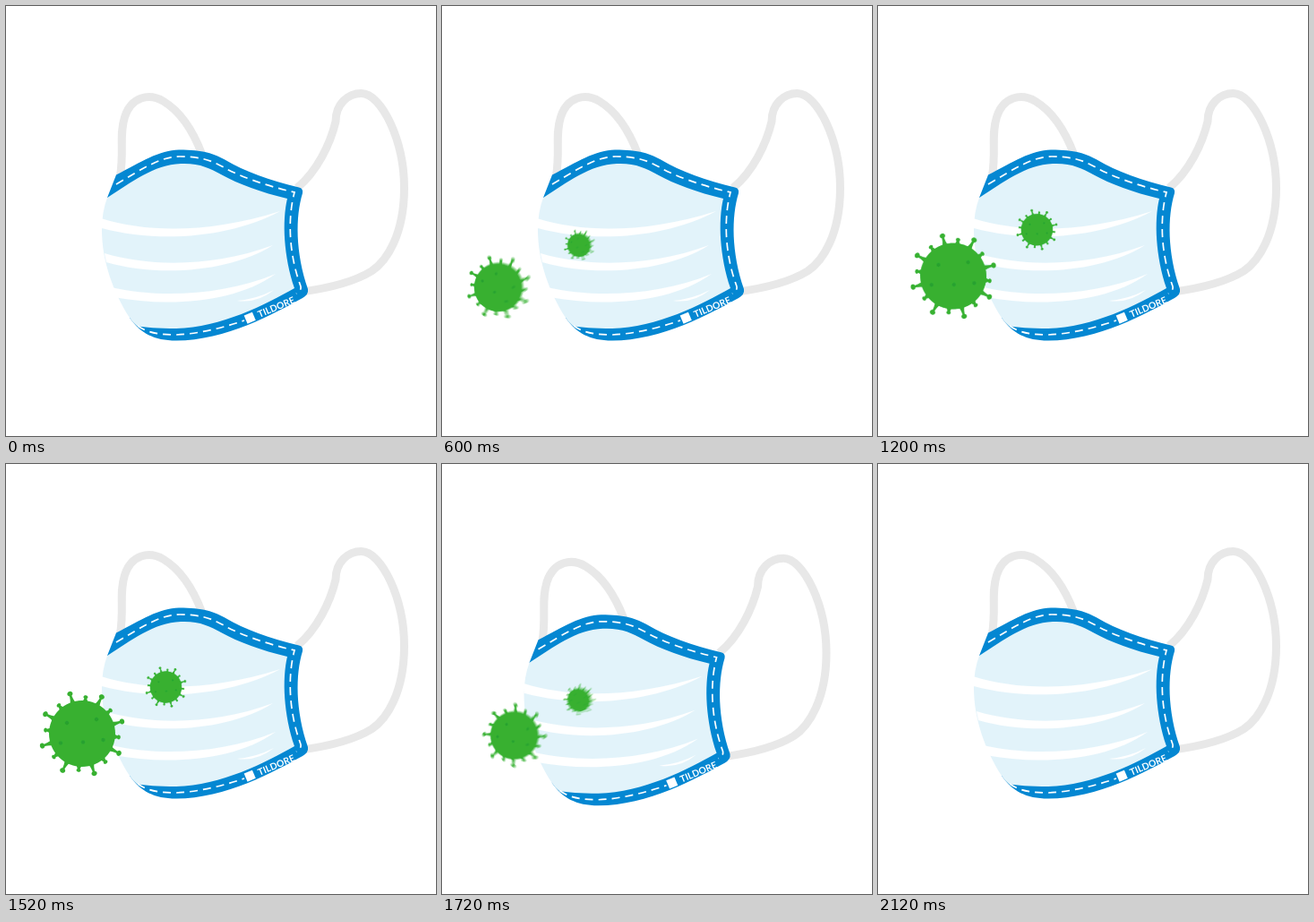
An HTML page with a canvas for the animation above (2400 ms loop, 480x480 px).

```html
<!DOCTYPE html>
<html lang="en">
<head>
<meta charset="utf-8">
<title>Mask and viruses</title>
<style>
html, body { margin: 0; height: 100%; overflow: hidden; background: #fff; }
canvas { display: block; }
</style>
</head>
<body>
<canvas id="stage" width="480" height="480"></canvas>
<script>
const LOOP = 2400, STEP = 40, SHUTTER = 28, SAMPLES = 8;
const BLUE = '#0487d2', PALE = '#e2f3fa', GREY = '#e8e8e8', GREEN = '#35b233', DARK = '#2aa22c';

const makeLayer = size => {
  const c = document.createElement('canvas');
  c.width = c.height = size;
  return c.getContext('2d');
};
const ctx = document.getElementById('stage').getContext('2d');
const blurLayer = makeLayer(480);
blurLayer.imageSmoothingQuality = 'high';

const progress = (t, from, to) => Math.min(1, Math.max(0, (t - from) / (to - from)));
const smooth = u => u * u * (3 - 2 * u);
const cubicOut = u => 1 - (1 - u) ** 3;

const straps = new Path2D(
  'M127.5 190C132 160 126 145 132.5 124C140 101 160 97 176 106.5C195 118 209 140 218.5 165' +
  'M325 203C347 185 362 154 368 129C368 109 382 97.5 396.5 97.5C419 97.5 444.5 150 444.5 203' +
  'C444.5 255 425 285 408 296C390 307 360 315 330 319');
const border = new Path2D(
  'M123 188.5C150 174.5 172 160.5 193 160.5C220 160.5 232 164.5 246 172.5C265 184 295 195 327 202.5' +
  'Q332 203.5 331 209C323 235 323 275 337 316Q338 322 331 326' +
  'C300 343 245 373.5 190 373.5C165 373.5 150 365 138 348L200 300L113 214Z');
const cloth = new Path2D(
  'M113 214C140 197 165 177 195 176C215 175 228 181 240 188C260 199 285 208 314 215' +
  'C308 240 310 280 322 315C290 333 240 359 190 360C170 360 155 359 146 357' +
  'Q142 354 138 348C120 320 107 285 107 250Q107 230 113 214Z');
const folds = new Path2D(
  'M106 237C160 254 230 253 306 229C250 259 170 265 107 248Z' +
  'M110 276C160 291 230 292 298 267C250 297 170 303 112 286Z' +
  'M117 314C170 326 240 324 301 299C255 332 180 336 120 325Z' +
  'M258 329Q280 327 299 317Q281 332 258 329Z');
const stitches = new Path2D(
  'M123 199C150 183 172 168 194 168C216 168 229 172 243 180C262 191 292 201 322 208' +
  'C314 238 316 278 329 313Q330 318 324 321' +
  'M147 357C158 365 172 367 190 367C215 366 243 359 266 351');

// One virus with body radius 37, drawn at double size.
const sprite = makeLayer(200);
function drawSprite(g) {
  const disc = (x, y, r) => { g.beginPath(); g.arc(x, y, r, 0, 7); g.fill(); };
  g.translate(100, 100);
  g.scale(2, 2);
  g.fillStyle = GREEN;
  disc(0, 0, 37);
  for (let i = 0; i < 16; i++) {
    const long = i % 2 === 0, tip = long ? 46.5 : 41;
    g.save();
    g.rotate((-107 + i * 22.5) * Math.PI / 180);
    g.beginPath();
    g.moveTo(35, -3.5);
    g.quadraticCurveTo(39, -1.2, tip, -1.2);
    g.lineTo(tip, 1.2);
    g.quadraticCurveTo(39, 1.2, 35, 3.5);
    g.fill();
    g.beginPath();
    g.ellipse(tip, 0, long ? 2.7 : 2, long ? 3.1 : 2.5, 0, 0, 7);
    g.fill();
    g.restore();
  }
  g.fillStyle = DARK;
  for (const [x, y] of [[-17, -12], [16, -16], [1, 9.5], [23.5, 7], [-24, 10.5]]) disc(x, y, 2.2);
}
drawSprite(sprite);

function maskShift(t) {
  const k = smooth(progress(t, 1520, 1760)) - smooth(progress(t, 1760, 2120));
  return [-16.7 * k, 8.4 * k];
}

function drawMask(t) {
  ctx.save();
  ctx.translate(...maskShift(t));
  ctx.strokeStyle = GREY;
  ctx.lineWidth = 9;
  ctx.stroke(straps);
  ctx.fillStyle = BLUE;
  ctx.fill(border);
  ctx.fillStyle = PALE;
  ctx.fill(cloth);
  ctx.fillStyle = ctx.strokeStyle = '#fff';
  ctx.fill(folds);
  ctx.lineWidth = 1.7;
  ctx.setLineDash([9, 6]);
  ctx.stroke(stitches);
  ctx.translate(283, 348);
  ctx.rotate(-23 * Math.PI / 180);
  ctx.fillRect(-15, -9, 10, 10);
  ctx.font = 'bold 10.4px Lato, sans-serif';
  ctx.fillText('TILDORE', 0, 0);
  ctx.restore();
}

function drawVirus(x, y, size, turn) {
  if (size <= 0) return;
  const g = blurLayer;
  g.save();
  g.translate(x, y);
  g.rotate(turn * Math.PI / 180);
  g.scale(size / 2, size / 2);
  g.drawImage(sprite.canvas, -100, -100);
  g.restore();
}

function drawViruses(t) {
  const away = 1 - cubicOut(progress(t, 360, 1520));
  const leave = smooth(progress(t, 1520, 2100));
  const size = cubicOut(progress(t, 360, 1030)) * (1 - leave);
  const turn = 90 * away + 70 * leave;
  const [dx, dy] = maskShift(t);
  drawVirus(85 - 44 * away - 15 * leave, 301 + 26 * away + 7 * leave, size, turn);
  drawVirus(178.5 - 51 * away - 37 * leave + dx, 249 + 36 * away + 24 * leave + dy, size * 0.48, turn);
}

// Motion blur: average several moments while the shutter is open.
function drawBlurred(t) {
  blurLayer.clearRect(0, 0, 480, 480);
  blurLayer.globalCompositeOperation = 'lighter';
  blurLayer.globalAlpha = 1 / SAMPLES;
  for (let i = 0; i < SAMPLES; i++) drawViruses(t + SHUTTER * ((i + 0.5) / SAMPLES - 0.5));
  ctx.drawImage(blurLayer.canvas, 0, 0);
}

const start = performance.now();
function frame() {
  const t = Math.floor((performance.now() - start) % LOOP / STEP) * STEP;
  ctx.fillStyle = '#fff';
  ctx.fillRect(0, 0, 480, 480);
  drawMask(t);
  drawBlurred(t);
  requestAnimationFrame(frame);
}
frame();
</script>
</body>
</html>
```
